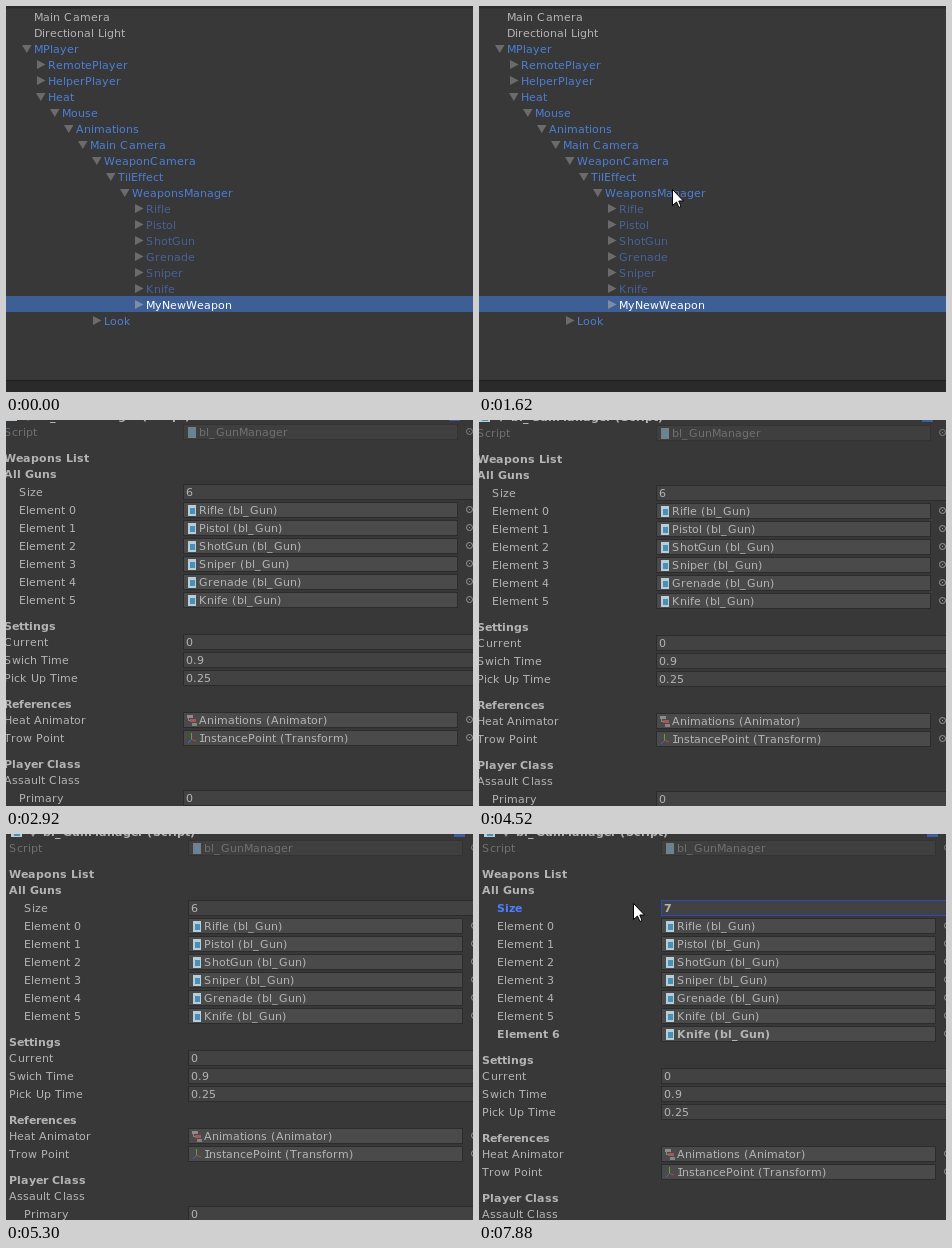
An HTML page with a canvas for the animation above (8000 ms loop, 467 px wide and 386 px high).

```html
<!DOCTYPE html>
<html>
<head>
<meta charset="utf-8">
<style>
html, body { margin: 0; height: 100%; overflow: hidden; background: #383838; }
canvas { display: block; }
</style>
</head>
<body>
<canvas id="stage" width="467" height="386"></canvas>
<script>
const g = document.getElementById('stage').getContext('2d');
const LOOP = 8000;
const GRAY = '#b4b4b4', DIM = '#707070', BLUE = '#4c7ed8', FADED = '#45629a', FOCUS = '#4c7eff';

function rect(x, y, w, h, color) {
  g.fillStyle = color;
  g.fillRect(x, y, w, h);
}

function shape(color, ...pts) {
  g.fillStyle = color;
  g.beginPath();
  for (let i = 0; i < pts.length; i += 2) g.lineTo(pts[i], pts[i + 1]);
  g.closePath();
  g.fill();
}

function line(color, ...pts) {
  g.strokeStyle = color;
  g.lineWidth = 1;
  g.beginPath();
  for (let i = 0; i < pts.length; i += 2) g.lineTo(pts[i], pts[i + 1]);
  g.stroke();
}

// Whole-pixel letter advances, as in hinted interface text
const WIDE = { ' ': 4, '(': 5, ')': 5, _: 7, C: 9, K: 8, S: 8, I: 5, k: 7, '.': 4 };
const WIDE_BOLD = { ' ': 4, '(': 6, ')': 6, _: 8, a: 8, m: 12 };

function text(str, x, y, color = GRAY, bold = false) {
  const wide = bold ? WIDE_BOLD : WIDE;
  const font = (bold ? 'bold ' : '') + '11px "DejaVu Sans", sans-serif';
  g.fillStyle = color;
  for (const c of str) {
    const serifI = c === 'I' && !bold;
    g.font = serifI ? '11px "DejaVu Sans Mono", monospace' : font;
    g.fillText(c, x, y);
    x += wide[c] || Math.round(g.measureText(c).width);
  }
}

// ---- Hierarchy: depth, arrow (v open, > closed), colour, name
const TREE = [
  [0, '', GRAY, 'Main Camera'],
  [0, '', GRAY, 'Directional Light'],
  [0, 'v', BLUE, 'MPlayer'],
  [1, '>', BLUE, 'RemotePlayer'],
  [1, '>', BLUE, 'HelperPlayer'],
  [1, 'v', BLUE, 'Heat'],
  [2, 'v', BLUE, 'Mouse'],
  [3, 'v', BLUE, 'Animations'],
  [4, 'v', BLUE, 'Main Camera'],
  [5, 'v', BLUE, 'WeaponCamera'],
  [6, 'v', BLUE, 'TilEffect'],
  [7, 'v', BLUE, 'WeaponsManager'],
  ...['Rifle', 'Pistol', 'ShotGun', 'Grenade', 'Sniper', 'Knife'].map(n => [8, '>', FADED, n]),
  [8, '>', GRAY, 'MyNewWeapon'],
  [5, '>', BLUE, 'Look']
];

function hierarchy(selected) {
  rect(0, 0, 467, 2, '#2b2b2b');
  rect(0, 2, 467, 1, '#303030');
  rect(0, 374, 467, 1, '#1f1f1f');
  rect(0, 375, 467, 11, '#2a2a2a');
  TREE.forEach(([depth, arrow, color, name], i) => {
    const x = 28 + 14 * depth, y = 2 + 16 * i, on = name === selected;
    if (on) rect(0, y, 467, 16, '#3e5f96');
    const tint = on ? '#7f8ca6' : '#6b6b6b';
    if (arrow === 'v') shape(tint, x - 12, y + 5, x - 2.5, y + 5, x - 7.2, y + 13);
    if (arrow === '>') shape(tint, x - 11, y + 4, x - 11, y + 13, x - 2.5, y + 8.5);
    text(name, x, y + 13, on ? '#fff' : color);
  });
}

// ---- Inspector: every row is placed by the vertical centre of its text
function field(y, w, fill, edge = '#2c2c2c') {
  rect(177, y - 8, w, 16, edge);
  rect(178, y - 7, w - 2, 14, fill);
}

const icons = {
  script(y) {
    rect(182, y - 5, 8, 11, '#b9cdd6');
    rect(184, y - 2, 5, 6, '#4a8fb5');
  },
  animator(y) {
    rect(181, y - 5, 6, 3, '#8c8c8c');
    rect(184, y - 1, 6, 3, '#a05a5c');
    rect(186, y + 3, 5, 3, '#858585');
    line('#8c8c8c', 182.5, y - 2, 182.5, y + 0.5, 184, y + 0.5);
  },
  transform(y) {
    line('#62a03c', 185.5, y - 5, 185.5, y + 2);
    line('#b04a3c', 185.5, y + 1.5, 190, y + 3);
    line('#4a63c8', 185.5, y + 1.5, 182, y + 5);
  }
};

function label(str, y, indent = 0, color = GRAY, bold = false) {
  text(str, -2 + 15 * indent, y + 4, color, bold);
}

function value(name, val, y, indent = 0) {
  label(name, y, indent);
  field(y, 300, '#424242');
  text(val, 180, y + 4);
}

function object(name, val, icon, y, indent = 0, color = GRAY, bold = false) {
  const dim = color === DIM;
  label(name, y, indent, color, bold);
  field(y, 275, dim ? '#3f3f3f' : '#4a4a4a', dim ? '#333' : '#2c2c2c');
  g.globalAlpha = dim ? 0.45 : 1;
  icons[icon](y);
  g.globalAlpha = 1;
  text(val, 193, y + 4, color, bold);
  g.strokeStyle = dim ? '#808080' : '#9a9a9a';
  g.lineWidth = 1;
  g.beginPath();
  g.arc(463.5, y - 0.5, 3, 0, 7);
  g.stroke();
  rect(463, y - 1, 1, 1, g.strokeStyle);
}

function sizeRow(focus, size, selected, grown) {
  const y = 72;
  label('Size', y, 1, focus ? FOCUS : GRAY, grown);
  field(y, 300, '#424242', focus ? '#3049b8' : '#2c2c2c');
  if (selected) rect(180, 65, 8, 13, '#4f7ab5');
  text(size, 180, y + 4, GRAY, grown);
}

function inspector(dx, dy, t) {
  const grown = t >= 7880, focus = t >= 6270, typed = t >= 7500;
  g.save();
  g.translate(dx, dy);
  // component header, cut off by the top edge
  rect(0, -10, 11, 11, '#b9cdd6');
  rect(3, -6, 6, 6, '#4a8fb5');
  shape('#a0a0a0', 17, -7, 27, -7, 22, 1);
  text('bl_GunManager (Script)', 32, 0, GRAY, true);
  rect(443, -8, 11, 9, '#3f5f9a');

  object('Script', 'bl_GunManager', 'script', 12, 0, DIM);
  label('Weapons List', 38, 0, GRAY, true);
  label('All Guns', 54, 0, GRAY, true);
  sizeRow(focus, typed ? '7' : '6', focus && !typed, grown);
  ['Rifle', 'Pistol', 'ShotGun', 'Sniper', 'Grenade', 'Knife'].forEach((n, i) =>
    object('Element ' + i, n + ' (bl_Gun)', 'script', 90 + 18 * i, 1));
  if (grown) {
    object('Element 6', 'Knife (bl_Gun)', 'script', 198, 1, GRAY, true);
    g.translate(0, 18);
  }
  label('Settings', 206, 0, GRAY, true);
  value('Current', '0', 222);
  value('Swich Time', '0.9', 240);
  value('Pick Up Time', '0.25', 258);
  label('References', 284, 0, GRAY, true);
  object('Heat Animator', 'Animations (Animator)', 'animator', 300);
  object('Trow Point', 'InstancePoint (Transform)', 'transform', 318);
  label('Player Class', 344, 0, GRAY, true);
  label('Assault Class', 360);
  value('Primary', '0', 378, 1);
  g.restore();
}

// ---- Pointer
function arrow(x, y) {
  g.save();
  g.translate(x, y);
  shape('#fff', .5, .5, .5, 16.5, 4.5, 13, 7, 18.5, 9, 17.5, 6.8, 12, 11.5, 12);
  g.strokeStyle = '#000';
  g.lineWidth = 1;
  g.stroke();
  g.restore();
}

function beam(y) {
  const c = '#d8d8d8';
  rect(201, y + 1, 1, 14, c);
  for (const e of [y, y + 15]) {
    rect(198, e, 3, 1, c);
    rect(202, e, 3, 1, c);
  }
}

// Moves in n visible jumps between two times; ease bends the pace
function glide(t, t0, t1, n, first, [x0, y0], [x1, y1], ease) {
  const k = Math.min(n - 1, Math.floor((t - t0) / ((t1 - t0) / (n - 1)) + 1e-6));
  const p = ease((k + first) / (n - 1 + first));
  arrow(Math.round(x0 + (x1 - x0) * p), Math.round(y0 + (y1 - y0) * p));
}

const out = p => p * (1.5 - p / 2);
const inOut = p => p * p * (3 - 2 * p);
const even = p => p;

function pointer(t) {
  const a = [221, 299], b = [193, 183];
  if (t < 270) return;
  if (t < 1240) glide(t, 270, 950, 10, 0, [341, 377], a, out);
  else if (t < 2390) glide(t, 1240, 1620, 6, 1, a, b, inOut);
  else if (t < 2530) glide(t, 2390, 2460, 2, 1, b, [252, 5], even);
  else if (t < 5610) return;
  else if (t < 5970) glide(t, 5610, 5898, 5, 0, [227, 21], [203, 64], out);
  else if (t < 6110) beam(61);
  else if (t < 6270) beam(62);
  else if (t < 6330) arrow(201, 69);
  else if (t < 6880) beam(62);
  else glide(t, 6880, 6960, 2, 1, [201, 69], [154, 69], even);
}

const PAN = [[2920, 0, 0], [4520, 0, 1], [4620, 2, 1], [4710, 4, 2], [5300, 5, 2]];

function draw(now) {
  const t = now % LOOP;
  rect(0, 0, 467, 386, '#383838');
  if (t < 2920) {
    hierarchy(t < 1850 ? 'MyNewWeapon' : 'WeaponsManager');
  } else {
    const [, dx, dy] = PAN.filter(p => p[0] <= t).pop();
    inspector(dx, dy, t);
  }
  pointer(t);
}

const start = performance.now();
function tick() {
  draw(performance.now() - start);
  requestAnimationFrame(tick);
}
tick();
</script>
</body>
</html>
```
